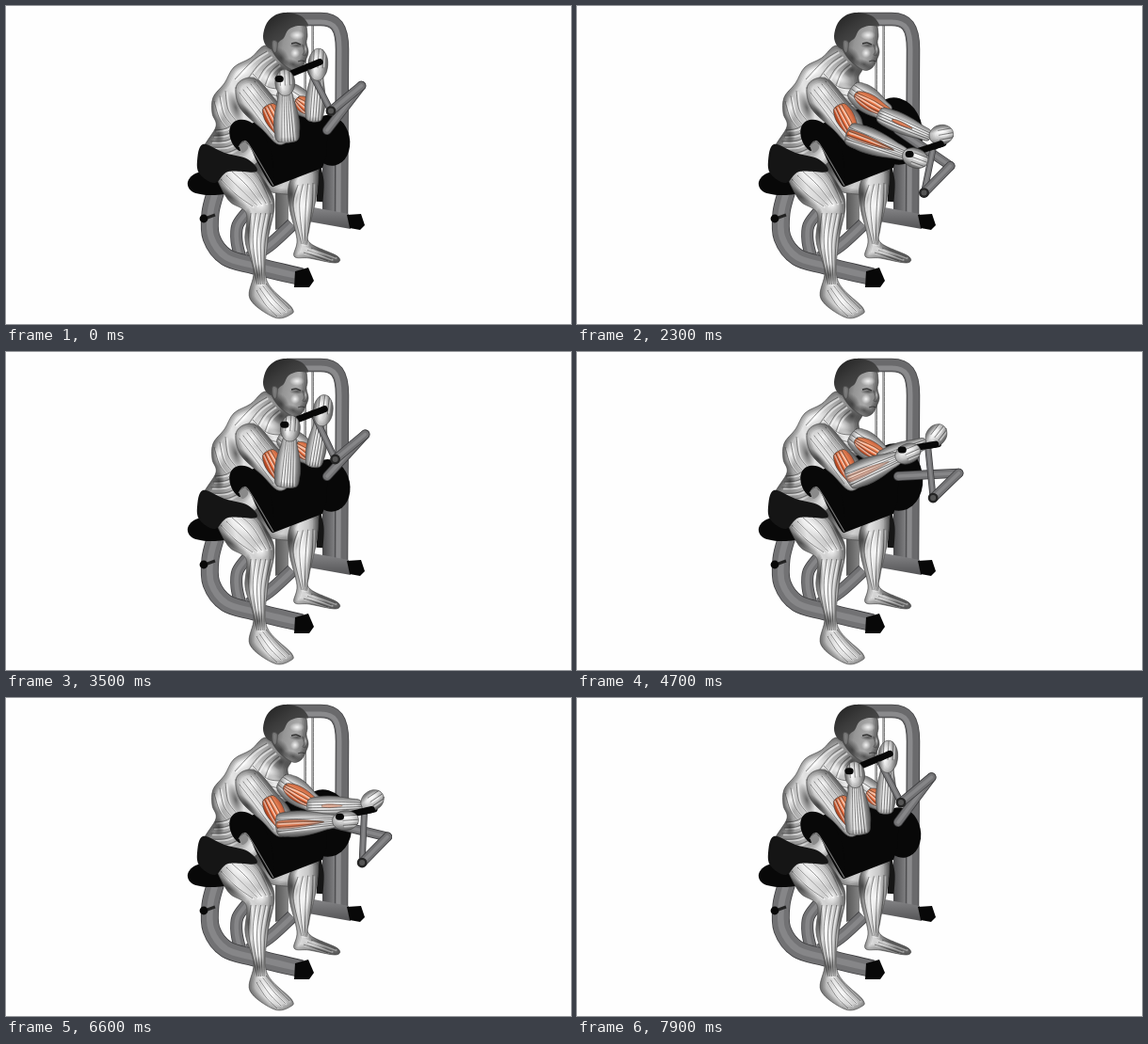
Recreate the animation shown at these times as an HTML page with a canvas. Size 600 by 338 pixels, loop 8000 ms.

```html
<!DOCTYPE html>
<html lang="en">
<head>
<meta charset="utf-8">
<title>Preacher curl</title>
<style>
html, body { margin: 0; width: 600px; height: 338px; overflow: hidden; background: #fefefe; }
canvas { display: block; }
</style>
</head>
<body>
<canvas id="c" width="600" height="338"></canvas>
<script>
const ctx = document.getElementById('c').getContext('2d');
const LINE = '#444', BLACK = '#080808';
const SKIN = ['#8a8a8a', '#e4e4e4', '#c6c6c6', '#777'];
const ORANGE = ['#d0603c', '#f58a58', '#ea6836', '#b4441f'];

const mix = (a, b, t) => a + (b - a) * t;
const blend = (a, b, t) => a.map((v, i) => mix(v, b[i], t));
const clamp = v => Math.max(0, Math.min(1, v));
const polar = (x, y, r, deg) =>
  [x + r * Math.cos(deg * Math.PI / 180), y + r * Math.sin(deg * Math.PI / 180)];

// smooth curve through x,y pairs
function curve(a, closed) {
  const n = a.length / 2;
  const pt = i => {
    i = closed ? (i + n) % n : Math.max(0, Math.min(n - 1, i));
    return [a[i * 2], a[i * 2 + 1]];
  };
  ctx.beginPath();
  ctx.moveTo(a[0], a[1]);
  for (let i = 0; i < (closed ? n : n - 1); i++) {
    const [p, q, r, s] = [pt(i - 1), pt(i), pt(i + 1), pt(i + 2)];
    ctx.bezierCurveTo(q[0] + (r[0] - p[0]) / 6, q[1] + (r[1] - p[1]) / 6,
      r[0] - (s[0] - q[0]) / 6, r[1] - (s[1] - q[1]) / 6, r[0], r[1]);
  }
  if (closed) ctx.closePath();
}

function stroke(color, w) {
  ctx.strokeStyle = color;
  ctx.lineWidth = w;
  ctx.stroke();
}

function line(a, color, w) {
  curve(a, false);
  stroke(color, w);
}

function lin(x0, y0, x1, y1, cols) {
  const g = ctx.createLinearGradient(x0, y0, x1, y1);
  cols.forEach((c, i) => g.addColorStop(i / (cols.length - 1), c));
  return g;
}

function fill(a, paint) {
  curve(a, true);
  ctx.fillStyle = paint;
  ctx.fill();
}

function poly(a, paint) {
  ctx.beginPath();
  for (let i = 0; i < a.length; i += 2) ctx.lineTo(a[i], a[i + 1]);
  ctx.fillStyle = paint;
  ctx.fill();
}

// rounded volume: darker towards its outline, details clipped inside
function solid(a, paint, detail, rim = 0.09) {
  fill(a, paint);
  ctx.save();
  ctx.clip();
  if (detail) detail();
  curve(a, true);
  for (let w = 2; w <= 11; w += 3) stroke(`rgba(20,20,20,${rim})`, w);
  ctx.restore();
  curve(a, true);
  stroke(LINE, 0.6);
}

// muscle fibres fanned between two curves
function fibres(a, b, n) {
  for (let i = 0; i <= n; i++) {
    const c = blend(a, b, i / n);
    line(c.map(v => v + 1.4), 'rgba(255,255,255,.55)', 1.7);
    line(c, 'rgba(40,40,40,.55)', 0.9);
  }
}

function glow(x, y, rx, ry, rot, tone, alpha) {
  ctx.save();
  ctx.translate(x, y);
  ctx.rotate(rot);
  ctx.scale(rx, ry);
  const g = ctx.createRadialGradient(0, 0, 0, 0, 0, 1);
  g.addColorStop(0, `rgba(${tone},${tone},${tone},${alpha})`);
  g.addColorStop(1, `rgba(${tone},${tone},${tone},0)`);
  ctx.fillStyle = g;
  ctx.fillRect(-1, -1, 2, 2);
  ctx.restore();
}
const lit = (x, y, rx, ry, rot = 0) => glow(x, y, rx, ry, rot, 255, 0.85);
const shade = (x, y, rx, ry, rot = 0) => glow(x, y, rx, ry, rot, 25, 0.6);

// muscle along a-b; taper gives the width kept at the far end
function spindle(a, b, w, cols, start, taper, count) {
  const len = Math.hypot(b[0] - a[0], b[1] - a[1]);
  const half = u => w * (mix(start, taper, u) + 0.42 * Math.sin(Math.PI * Math.pow(u, 0.75)));
  const top = [], low = [];
  for (let u = 0; u <= 1; u += 0.2) {
    top.push(u * len, -half(u));
    low.unshift(u * len, half(u));
  }
  ctx.save();
  ctx.translate(...a);
  ctx.rotate(Math.atan2(b[1] - a[1], b[0] - a[0]));
  solid(top.concat(low), lin(0, -w, 0, w, cols), () => {
    const edge = s => [0, s * w * start, len / 2, s * w * 0.6, len, s * w * taper];
    if (count) fibres(edge(-0.6), edge(0.7), count);
  }, cols === ORANGE ? 0.03 : 0.08);
  ctx.restore();
}

function tube(a, w, tone = '#727274') {
  ctx.lineJoin = 'round';
  line(a, '#3e3e40', w);
  line(a, tone, w - 1.6);
  line(a, '#868688', w * 0.35);
}

function disc(p, r, paint) {
  ctx.beginPath();
  ctx.arc(...p, r, 0, 7);
  ctx.fillStyle = paint;
  ctx.fill();
}

function tower() {
  for (const x of [317, 325]) {
    line([x, 20, x, 100], '#999', 1.6);
    line([x + 1.5, 20, x + 1.5, 100], '#444', 0.7);
  }
  poly([286, 180, 300, 180, 300, 234, 286, 238], lin(286, 0, 300, 0, ['#555', '#858585']));
  poly([336, 150, 352, 150, 352, 222, 336, 219], lin(336, 0, 352, 0, ['#4a4a4c', '#8c8c8e']));
  line([329, 165, 334, 186, 333, 208], '#161616', 7);
  for (const [w, col, d] of [[14.5, '#444446', 0], [12.8, '#6a6a6c', 0], [5, '#8a8a8c', -3]]) {
    ctx.beginPath();
    ctx.moveTo(298, 14 - d);
    ctx.lineTo(334, 14 - d);
    ctx.bezierCurveTo(350, 14 - d, 357 + d, 22 - d, 357 + d, 46);
    ctx.lineTo(356 + d, 223);
    stroke(col, w);
  }
  poly([321, 213, 364, 221, 366, 237, 321, 229], lin(0, 214, 0, 236, ['#858587', '#555557']));
  poly([362, 222, 377, 221, 381, 233, 376, 238, 365, 236], BLACK);
}

function seatFrame() {
  tube([304, 232, 280, 254, 258, 268], 14);
  tube([256, 219, 246, 233, 245, 250, 250, 272], 13);
  tube([223, 196, 217, 220, 218, 246, 234, 267, 264, 276, 314, 288], 19);
  poly([307, 282, 321, 278, 327, 292, 322, 299, 306, 299], BLACK);
  line([211, 226, 222, 222], '#222', 3);
  disc([210, 226], 4.4, BLACK);
  fill([193, 187, 204, 177, 230, 178, 243, 195, 222, 201, 199, 198], BLACK);
}

function farLeg() {
  solid([252, 160, 300, 165, 328, 168, 331, 182, 320, 198, 296, 200, 270, 192],
    lin(275, 165, 325, 200, ['#555', '#d0d0d0', '#777']));
  solid([301, 188, 316, 171, 331, 176, 329, 205, 322, 237, 323, 252, 352, 266, 350, 273, 322, 268,
    306, 266, 309, 248, 301, 214], lin(299, 0, 332, 0, SKIN), () => {
    shade(303, 200, 9, 14);
    lit(316, 213, 8, 22, 0.1);
    lit(328, 262, 14, 3, 0.4);
    fibres([310, 190, 305, 212, 314, 253], [326, 188, 325, 214, 319, 254], 3);
    fibres([316, 262, 342, 271], [324, 257, 350, 267], 2);
  });
}

function nearLeg() {
  solid([222, 174, 241, 165, 263, 173, 279, 193, 285, 213, 278, 250, 277, 292, 303, 320, 302, 328,
    285, 331, 259, 311, 263, 282, 254, 250, 255, 220, 236, 206], lin(228, 212, 287, 196, SKIN), () => {
    lit(250, 185, 23, 8, 0.65);
    lit(271, 211, 9, 9);
    lit(265, 246, 5, 28, -0.1);
    lit(281, 313, 15, 6, 0.8);
    fibres([228, 184, 244, 200, 262, 213], [252, 168, 268, 182, 281, 209], 4);
    fibres([260, 220, 258, 252, 267, 296], [281, 220, 275, 252, 274, 296], 4);
    fibres([266, 302, 276, 318, 288, 330], [276, 295, 290, 311, 301, 322], 3);
    shade(238, 203, 22, 7, 0.6);
    shade(257, 238, 5, 24);
    shade(276, 190, 5, 18, -0.4);
    shade(280, 246, 4, 30);
    shade(268, 286, 8, 12);
  });
}

function torso() {
  solid([275, 42, 260, 55, 242, 65, 232, 82, 220, 97, 219, 114, 223, 128, 210, 150, 211, 164, 262, 170,
    284, 128, 303, 113, 302, 91, 299, 76, 303, 65, 292, 50], lin(216, 110, 303, 85, SKIN), () => {
    lit(252, 70, 16, 8, -0.4);
    lit(278, 77, 15, 8, 0.4);
    lit(286, 92, 12, 9, 0.4);
    lit(227, 108, 7, 14);
    fibres([277, 48, 262, 58, 243, 78], [290, 62, 280, 72, 272, 94], 3);
    fibres([262, 72, 278, 86, 297, 88], [262, 84, 278, 99, 297, 106], 2);
    fibres([233, 90, 236, 110, 246, 124], [221, 101, 227, 120, 238, 134], 2);
    fibres([246, 122, 234, 130, 222, 132], [252, 148, 234, 156, 213, 156], 4);
    shade(292, 68, 10, 9);
    shade(244, 108, 7, 18, -0.3);
    shade(254, 142, 12, 22, 0.4);
    shade(226, 137, 6, 10);
    shade(299, 108, 8, 12);
  });
  fill([209, 147, 232, 156, 257, 163, 266, 176, 236, 176, 222, 188, 206, 179, 203, 165], '#151515');
}

function head() {
  solid([280, 26, 296, 14, 316, 17, 320, 30, 319, 39, 321, 49, 318, 58, 313, 66, 304, 68, 290, 58, 281, 43],
    lin(282, 36, 321, 44, ['#555', '#959595', '#a8a8a8', '#777']), () => {
      lit(309, 31, 8, 5);
      lit(307, 50, 5, 5, 0.4);
      lit(318, 46, 2, 5);
      shade(292, 55, 8, 12, -0.5);
      shade(305, 62, 10, 5, 0.4);
      shade(309, 42, 8, 3);
      line([303, 40, 308, 39, 313, 41], '#333', 1.4);
      line([310, 59, 314, 58, 318, 59], '#444', 1.2);
      line([315, 41, 317, 48, 315, 52, 319, 52], '#555', 0.8);
    });
  fill([273, 32, 277, 18, 287, 9, 300, 7, 314, 11, 321, 21, 310, 21, 300, 25, 295, 34, 290, 38, 283, 46, 276, 42],
    lin(280, 10, 300, 38, ['#262626', '#3a3a3a', '#4a4a4a']));
  solid([283, 37, 288, 38, 288, 45, 286, 50, 283, 46], '#999');
}

function pad() {
  poly([258, 126, 300, 109, 328, 107, 342, 126, 340, 160, 336, 172, 284, 192], BLACK);
  fill([238, 129, 247, 121, 262, 125, 280, 150, 284, 192, 268, 168, 257, 147, 248, 154, 239, 143], BLACK);
  line([247, 150, 252, 144, 259, 149, 284, 191], '#777', 1.2);
  fill([248, 149, 254, 144, 257, 151, 251, 156], '#8a8a8a');
}

function fist(h, ang, w, l) {
  ctx.save();
  ctx.translate(...h);
  ctx.rotate(ang);
  const ring = [];
  for (let i = 0; i < 8; i++) {
    const [x, y] = polar(0, 0, 1, i * 45 + 22.5);
    ring.push(x * l * 1.08, y * w * 1.05);
  }
  solid(ring, lin(0, -w, 0, w, SKIN), () => {
    lit(0, -w * 0.3, l * 0.8, w * 0.5);
    fibres([-l * 0.2, -w * 0.5, l, -w * 0.5], [-l * 0.2, w * 0.5, l, w * 0.5], 2);
  }, 0.06);
  ctx.restore();
}

// a: handle angle in degrees, p: extension 0..1
function draw(p) {
  const a = mix(-66, 58, p), s = clamp(p / 0.45), arm = a * 1.12 - 18;
  const tubeEnd = polar(320, 165, 59, a);
  const corner = polar(344, 137, 62, a * 0.9 + 1);
  const handL = polar(297, 138, 63 + a * 0.1, arm);
  const handR = polar(332, 116, 57 + a * 0.05, arm);
  const barL = [handL[0] - 7, handL[1] - 4];
  const barR = [handR[0] + 2, handR[1] + mix(-3, 9, s)];
  const link = blend(barL, barR, 0.72);
  const elbowL = [mix(299, 288, s), mix(144, 135, s)];
  const elbowR = [mix(327, 321, s), mix(122, 115, s)];
  const angle = (e, h) => Math.atan2(h[1] - e[1], h[0] - e[0]);

  ctx.lineCap = 'butt';
  ctx.fillStyle = '#fefefe';
  ctx.fillRect(0, 0, 600, 338);
  tower();
  ctx.beginPath();
  ctx.ellipse(mix(344, 339, s), mix(143, 133, s), mix(21, 28, s), mix(27, 36, s), -0.2, 0, 7);
  ctx.fillStyle = BLACK;
  ctx.fill();
  seatFrame();
  farLeg();
  nearLeg();
  torso();
  head();
  pad();

  ctx.lineCap = 'round';
  tube([341, 132, ...corner], 10);
  spindle([292, 88], [330, 115], 15, SKIN, 0.5, 0.5, 2);
  spindle(blend([309, 99], [296, 94], s), blend([326, 113], [331, 114], s), 11, ORANGE, 0.3, 0.4, 2);
  const wristR = blend(elbowR, [handR[0] - 4 * s, handR[1] + 5 * s], 0.87);
  spindle(elbowR, wristR, 11, SKIN, 0.6, 0.45, 3);
  ctx.globalAlpha = clamp(p * 2 - 0.8);
  spindle(blend(elbowR, wristR, 0.26), blend(elbowR, wristR, 0.64), 3, ORANGE, 0.3, 0.2, 0);
  ctx.globalAlpha = 1;
  tube([...link, ...tubeEnd], 7);
  tube([...corner, ...tubeEnd], 10);
  disc(tubeEnd, 5.4, '#242424');
  disc(tubeEnd, 3, '#555');
  line([...barL, ...barR], BLACK, 7);
  fist(handR, angle(elbowR, handR) - 0.5 * s, 10, mix(16, 12, s));
  line([...blend(barL, barR, 0.75), ...blend(barL, barR, mix(1, 0.93, s))], BLACK, 7);

  solid([244, 87, 254, 77, 268, 79, 288, 102, 302, 120, 302, 140, 289, 147, 272, 131, 249, 109],
    lin(251, 116, 281, 91, SKIN), () => {
      lit(261, 91, 11, 8, 0.8);
      fibres([248, 92, 262, 110, 284, 140], [264, 80, 278, 98, 294, 118], 4);
      shade(256, 114, 16, 5, 0.8);
    });
  spindle([278, 106], [295, 138], 11, ORANGE, 0.5, 0.45, 2);
  const wristL = blend(elbowL, handL, 0.86);
  spindle(elbowL, wristL, 13, SKIN, 0.75, 0.42, 4);
  ctx.globalAlpha = clamp(p * 3 - 1);
  spindle(elbowL, blend(elbowL, wristL, 0.78), 5, ORANGE, 0.7, 0.1, 1);
  ctx.globalAlpha = 1;
  fist(handL, angle(elbowL, handL), 10, 13);
  line([...barL, barL[0] + 2, barL[1]], BLACK, 7);
}

// quicker lowering, slower lifting, short rests between
function extension(t) {
  const ease = u => (1 - Math.cos(Math.PI * clamp(u))) / 2;
  const k = (t + 0.1) % 4;
  return k < 1.8 ? ease(k / 1.7) : 1 - ease((k - 1.8) / 2.1);
}

function frame(now) {
  draw(extension(Math.floor((now % 8000) / 100) / 10));
  requestAnimationFrame(frame);
}
requestAnimationFrame(frame);
</script>
</body>
</html>
```
